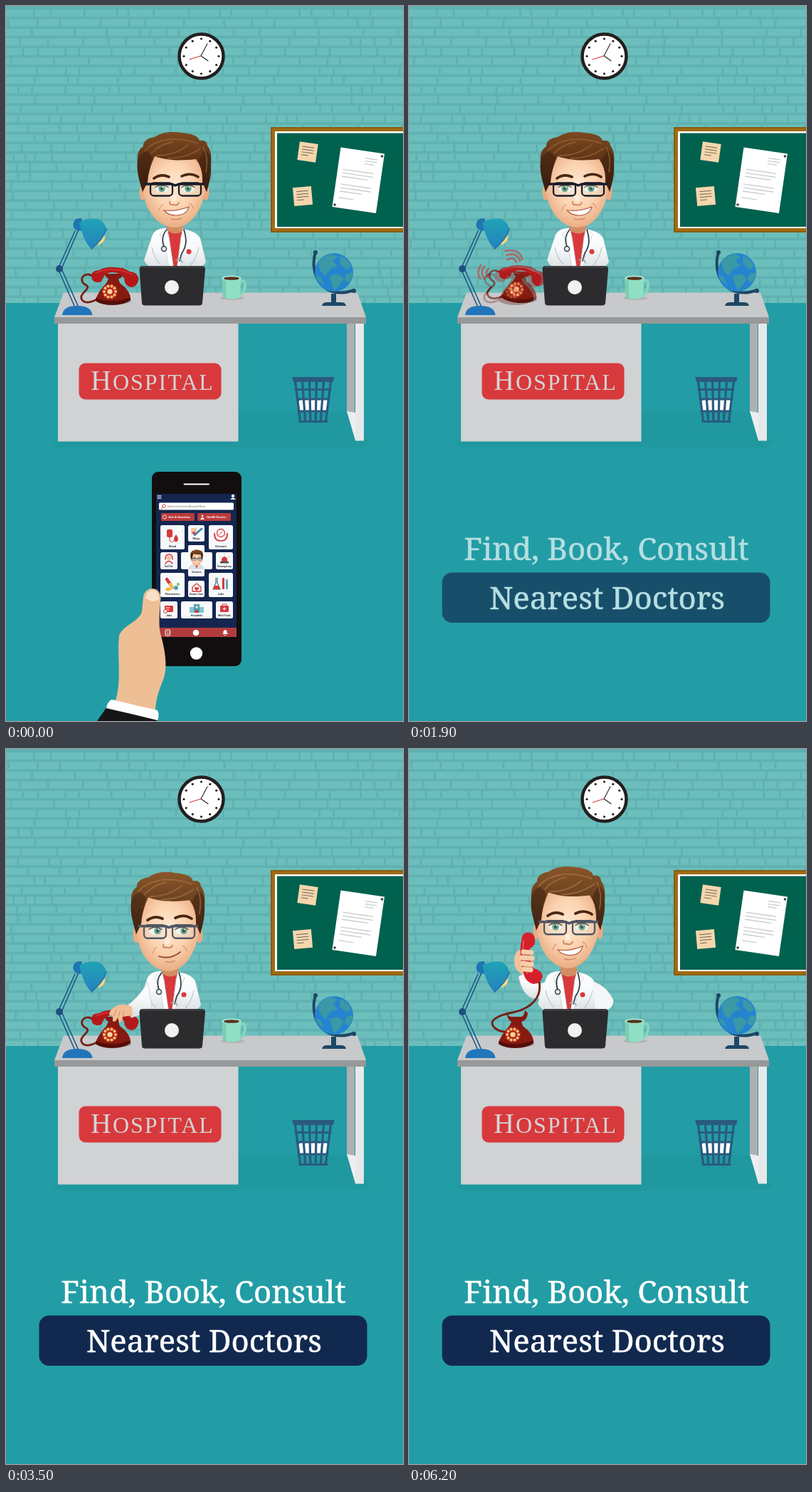
An HTML page for the animation above (8 s loop, 558 px wide and 1004 px high).

```html
<!DOCTYPE html>
<html lang="en">
<head>
<meta charset="utf-8">
<title>Doctors</title>
<style>
html, body { margin: 0; width: 100%; height: 100%; overflow: hidden; background: #229da5; }
svg { display: block; width: 100%; height: 100%; }
.mix { isolation: isolate; }
.mix > g { mix-blend-mode: plus-lighter; }
.slab { font: 43.7px "Noto Serif", serif; fill: #fff; stroke: #fff; stroke-width: .5; text-anchor: middle; }
.ui { font-family: Roboto, sans-serif; font-weight: 700; }
</style>
</head>
<body>
<svg id="stage" viewBox="0 0 558 1004"></svg>
<script>
const rect = (x, y, w, h, fill, r = 0, more = '') =>
  `<rect x="${x}" y="${y}" width="${w}" height="${h}" rx="${r}" fill="${fill}" ${more}/>`;
const circ = (x, y, r, fill, more = '') => `<circle cx="${x}" cy="${y}" r="${r}" fill="${fill}" ${more}/>`;
const oval = (x, y, a, b, fill, more = '') => `<ellipse cx="${x}" cy="${y}" rx="${a}" ry="${b}" fill="${fill}" ${more}/>`;
const path = (d, fill, more = '') => `<path d="${d}" fill="${fill}" ${more}/>`;
const line = (d, color, w = 1, more = '') =>
  path(d, 'none', `stroke="${color}" stroke-width="${w}" stroke-linecap="round" stroke-linejoin="round" ${more}`);
const group = (id, body, more = '') => `<g id="${id}" ${more}>${body}</g>`;
const label = (s, x, y, size, fill, anchor = 'middle') =>
  `<text class="ui" x="${x}" y="${y}" font-size="${size}" fill="${fill}" text-anchor="${anchor}">${s}</text>`;
const fade = (id, kind, stops) => `<${kind}Gradient id="${id}" ${kind === 'linear' ? 'x2="0" y2="1"' : 'cx=".5" cy=".45" r=".6"'}>` +
  stops.map((c, i) => `<stop offset="${i / (stops.length - 1)}" stop-color="${c}"/>`).join('') + `</${kind}Gradient>`;
const range = n => [...Array(n).keys()];

function wall() {
  let seed = 11, d = '';
  const rnd = () => (seed = seed * 16807 % 2147483647) / 2147483647;
  for (let y = 5; y < 417; y += 13.5)
    for (let x = -rnd() * 30; x < 558;) {
      const w = rnd() < .3 ? 10 + rnd() * 12 : 28 + rnd() * 32;
      d += `M${x.toFixed(1)} ${y}h${w.toFixed(1)}v9.8h${-w.toFixed(1)}z`;
      x += w + 3;
    }
  return rect(0, 0, 558, 417, '#60b2b2') + path(d, '#6cbebc') + rect(0, 417, 558, 587, '#229da5');
}

function clock() {
  const dots = range(12).map(i => circ(274.5 + 24.5 * Math.sin(i * Math.PI / 6), 70.5 - 24.5 * Math.cos(i * Math.PI / 6), 1.6, '#231f20'));
  return circ(274.5, 70.5, 31, '#fff', 'stroke="#231f20" stroke-width="4.5"') + dots.join('') +
    line('M283 53L274 70L284 77', '#231f20', 1.1) + line('M258 75L274 70', '#d8393f', 1.1);
}

function board() {
  const note = (x, y, a) => `<g transform="translate(${x} ${y}) rotate(${a})">` + rect(-13, -13, 26, 26, '#f5d6ad') +
    line('M-8 -7h16M-8 -3h16M-8 1h16M-8 5h9', '#6f665a', 1) + '</g>';
  return rect(372, 170, 200, 148, '#8a5d10') + rect(374, 172, 200, 144, '#a06c12') + rect(378, 176, 200, 136, '#fff') +
    rect(381, 178.5, 200, 131.5, '#00614f') + note(424, 205, 8) + note(417, 267, -5) +
    path('M470.500 198.500L532 207.500L520 291L458.500 282z', '#fff') +
    `<g transform="translate(470.500 198.500) rotate(8.200)">` +
    line('M37 10h16M37 14h16M37 18h12M8 30h42M8 35h42M8 40h36M8 51h42M8 56h42M8 61h30M8 70h20', '#c9cbcd', 1.3) + '</g>' +
    circ(528.5, 211, 1.8, '#3a3f44') + circ(462, 279, 1.8, '#3a3f44');
}

function basket() {
  const bars = range(6).map(i => `M${406.5 + i * 10} 527L${413.5 + i * 7.2} 583`).join('');
  return path('M411 556Q414 550 420 554Q425 547 430 553Q436 548 440 554Q448 549 453 555L451 569H413z', '#fff') +
    line(bars + 'M407 538.500H456M409 552H454M411 569H452', '#2a5a80', 3.2) + line('M413 583.500H451', '#2a5a80', 3) +
    path('M402 521H461.500L460 528H404z', '#2a5a80');
}

const desk = () =>
  path('M65 612H327V570H480L510 612Q508 620 490 620H80Q66 620 65 612z', '#1f949c', 'opacity=".6"') +
  path('M479 445H490V571L479 571z', '#aeb0b2') + path('M479 569L491 571V610z', '#eceeef') + rect(491, 445, 12, 165.5, '#e6e8e9') +
  basket() + rect(73, 445, 253.500, 166.500, '#d0d2d4') +
  path('M81 402.500H494L506 437H68z', '#c8c9cb') + rect(68, 437, 438, 9, '#969899') +
  rect(102.5, 501.5, 200, 51, '#d8393c', 9) +
  `<text x="119" y="539" font-family="Liberation Serif, serif" font-size="40" letter-spacing="2" fill="#d3d5d6">H<tspan font-size="32">OSPITAL</tspan></text>`;

const lamp = () =>
  line('M97 423L73 369L97 316M102 423L78 369L102 314', '#1d5688', 1.6) + circ(75, 369, 5, '#1d4f7c') +
  path('M79 434Q80 421 100 421Q120 421 121.500 434z', '#2176bb') +
  oval(131, 327, 9, 7, '#fbd77c', 'transform="rotate(-45 131 327)"') +
  path('M95 304Q97 297 106 298L109 313Q104 318 98 314Q93 310 95 304z', '#1d75b3') +
  path('M103 304Q116 297 130 299Q140 304 141 314Q136 326 120 341Q109 331 103 304z', 'url(#shade)') +
  line('M141 313Q137 327 120 341', '#2476b0', 2);

const globe = () =>
  line('M435 346C425 378 447 414 489 399', '#1d4766', 4) + circ(435, 346, 3, '#1d4766') + circ(489, 400, 3, '#1d4766') +
  rect(457, 404, 7, 13, '#1d4766') + path('M444 421Q445 416 451 416H471Q477 416 478 421z', '#1d4766') +
  circ(461, 374, 27, '#2584cf') +
  path('M439 360Q446 350 458 348L466 352L459 358L466 365L456 369L449 379L442 372zM469 351Q480 355 485 365L479 370L470 363zM455 379L467 376L475 383L469 392L462 400L458 390zM478 376L487 374Q487 382 482 389L476 385zM435 378L442 381L447 391Q439 388 435 378z', '#3b98a5');

const mug = () => oval(318, 410, 17, 3, '#a9abad', 'opacity=".7"') + line('M330 386Q337 384 336 393Q335 403 329 405', '#83d6bb', 4) +
  path('M303.500 382H330.500L329 409Q317 414 305 409z', '#8fdfc4') + path('M303.500 382H309L309 411L305 409z', '#79cdb1') +
  oval(317, 382, 13.5, 3.5, '#a9ecd5') + oval(317, 382.5, 11, 2.3, '#55331f');

const laptop = () => path('M192 365H276Q280 365 280 370L276 417Q276 420.500 271 420.500H196Q191 420.500 191 417L187.500 370Q187.500 365 192 365z', '#2c2c2f') +
  line('M191 366.500H277', '#48484c', 1.5) + circ(233, 395, 10, '#f2f2f2');

// ---- telephone
const phoneBase = () => oval(151, 414, 25, 5, '#85878a', 'opacity=".8"') +
  path('M137 368Q139 376 144 376H157Q162 376 163 367L167 371Q166 381 158 383L160 389Q175 400 175 411Q166 418 150 418Q134 418 126 412Q129 402 141 389L144 383Q137 379 137 368z', '#861a10') +
  path('M126 410Q150 419 175 409V413Q166 420 150 420Q134 420 126 414z', '#560e08') +
  circ(146, 401, 11, '#b8261a') +
  range(10).map(i => circ(146 + 8 * Math.cos(i * .628), 401 + 8 * Math.sin(i * .628), 2, '#f0c278')).join('') + circ(146, 401, 3.6, '#f3d69b');
const restCord = () => line('M125 382C112 369 100 384 111 391C124 397 98 404 108 414Q113 419 128 412', '#722116', 2.8);
const restHandset = () =>
  path('M120 377Q122 371 131 371Q140 366 152 367Q166 367 174 373Q184 373 186.500 383Q185 394 176 395Q166 393 166 382Q160 374 150 374Q142 374 138 379L134 387Q125 390 121 384z', '#b3191a') +
  line('M126 375Q152 364 177 377', '#d33433', 1.6);
const telephone = () => restCord() + phoneBase() + restHandset();
const ringing = () => `<g transform="translate(5 -3) rotate(4 150 400)">${telephone()}</g>` +
  line('M138 356Q147 351 151 360M137 350Q152 345 156 358M135 344Q156 340 159 356', '#c9403f', 2.6) +
  line('M112 369Q106 373 111 381M106 366Q99 373 106 383M101 364Q94 373 100 383', '#c9403f', 2.6);

// ---- doctor
function head(pose) {
  const frame = pose === 'A' ? '#191c29' : '#505563', look = pose === 'B' ? 3 : 0;
  const eye = x => oval(x, 256.5, 9, 4.8, '#f4f7f5') + circ(x + look, 256.5, 4.8, '#5d9c78') + circ(x + look, 256.5, 2.2, '#193229') +
    circ(x + look + 1.5, 254.5, 1, '#fff') + line(`M${x - 9} 254.500Q${x} 248.500 ${x + 9} 254.500`, '#4a2a19', 1.5);
  const mouth = pose === 'B'
    ? line('M224 291Q240 296 254 285', '#9a4a34', 1.8) + line('M233 298Q240 300 246 297', '#d48b63', 1.4)
    : path('M222 287Q239 289 257 282Q254 294 239 294Q228 294 222 287z', '#fff', 'stroke="#b55c46" stroke-width="1.200"') +
      line('M232 299Q240 301 247 298', '#d48b63', 1.5);
  const hair = pose === 'A' ? 'url(#hairDark)' : 'url(#hairLight)';
  const strand = pose === 'A' ? '#a0693a' : '#b07a48';
  return oval(192, 262, 4.5, 11, '#e9ac83') + oval(281, 262, 4.5, 11, '#e9ac83') +
    path('M193 225C190 252 193 272 201 287C211 304 225 311 237 311C250 311 262 303 270 288C280 272 283 248 279 222Q260 203 237 205Q205 204 193 225z', 'url(#skin)') +
    path('M192 261C188 246 183 233 185 217C184 207 187 201 193 197C192 190 200 185 209 184C220 176 236 176 247 178C260 179 270 182 272 189Q282 187 283 196Q290 204 288 222C289 238 285 250 282 261L276 247Q277 228 267 215C250 217 228 218 209 211C204 222 200 234 199 247z', hair) +
    path('M192 261C188 246 183 233 185 217Q189 205 198 204L206 212Q200 228 199 247zM282 261L276 247Q277 228 270 218L279 202Q289 206 288 222C289 238 285 250 282 261z', '#371c0f', 'opacity=".45"') +
    line('M195 203C212 185 241 183 270 193M204 207Q216 194 234 191M212 210Q238 210 256 195M228 214Q256 213 273 200M277 198Q285 212 281 233', strand, 1.8, 'opacity=".6"') +
    line('M208 242Q218 235 229 240M247 239Q259 233 270 240', '#4a2713', 3.6) + eye(219) + eye(256) +
    line('M230 275Q229 280 235 279Q241 281 243 276', '#ca805b', 1.8) + oval(236, 270, 4, 5, '#fff0e0', 'opacity=".75"') + mouth +
    line('M215 287Q217 280 221 279M263 284Q261 277 257 277', '#db9a72', 1.2) +
    rect(203, 248.5, 31, 18, '#d9f0f0', 5, `fill-opacity=".2" stroke="${frame}" stroke-width="2.300"`) +
    rect(243, 248.5, 31, 18, '#d9f0f0', 5, `fill-opacity=".2" stroke="${frame}" stroke-width="2.300"`) +
    line('M196 250L204 250H233L238 252L243 250H273L278 250', frame, 3.4);
}

const torso = (x = 0) => `<g transform="translate(${x} 0)">` +
  path('M222 312Q208 313 205 324L194 357Q199 368 212 370H265Q279 366 281 359L273 326Q268 316 248 313z', 'url(#coat)') +
  path('M226 309H249L250 323L243 372H231z', '#d8393c') + path('M226 306H249V316Q238 323 227 316z', '#d28d62') +
  path('M226 312L216 320L224 340L230 371H236L229 324zM249 312L258 321L250 341L244 371H240L246 324z', '#fff', 'stroke="#c9ced2" stroke-width=".8"') +
  line('M205 339Q208 354 217 363M271 339Q268 354 259 364', '#bcc3c8', 1.2) +
  line('M226 314Q217 324 222 338M250 314Q257 334 247 347L244 358', '#33414c', 1.8) +
  circ(222, 341, 3.5, '#e8ecee', 'stroke="#33414c" stroke-width="1.500"') + line('M239 357Q244 352 248 360', '#9aa4ab', 1.6) +
  circ(257, 345, 3.5, '#d8393c') + '</g>';

const doctorA = () => torso() + head('A');
const doctorB = () => torso(-7) + `<g transform="translate(-9 -10.600) scale(1 1.037)">${head('B')}</g>`;
const reach = () => path('M199 327Q190 345 170 361L176 377Q193 374 205 361z', 'url(#coat)', 'stroke="#c6ccd0" stroke-width=".8"') +
  path('M177 362Q164 355 153 362Q143 368 146 375Q151 371 150 382Q154 385 157 377L159 384Q164 384 164 376L178 374z', '#f0bd94') +
  line('M152 374L155 367M158 376L160 369M164 375L166 369', '#cc8963', .9);
const doctorC = () => path('M206 321Q185 331 181 329L164 313L154 320Q159 344 173 350Q187 352 204 348z', 'url(#coat)', 'stroke="#c6ccd0" stroke-width=".8"') +
  torso(-13) + path('M258 326Q278 333 287 352Q289 361 278 367L262 365z', '#f4f6f7') +
  `<g transform="translate(-13 -23.500) scale(1 1.065)">${head('C')}</g>` +
  path('M149 289Q153 279 164 282L175 300Q176 313 169 319Q158 319 150 308Q146 299 149 289z', '#f0c19b') +
  line('M183 327C187 349 172 363 150 369C122 374 112 382 119 390Q124 396 134 397', '#722116', 2.8) + phoneBase() +
  path('M159 263Q163 256 171 258Q178 261 177 272Q176 277 170 280Q169 298 175 308Q186 310 188 319Q185 330 175 330Q164 328 161 315Q155 291 157 275z', '#d51f2b') +
  line('M161 269Q158 292 166 315', '#ee5557', 1.8) +
  line('M161 285L172 286M159 293L173 294M160 301L172 303M162 309L171 310', '#f7cfab', 7) +
  line('M163 289H173M163 297H174M164 306H173', '#cb8861', .8);

// ---- hand-held app
const tiles = [
  ['Blood', 217, 729, 34, 34], ['Blogs', 256, 729, 23, 23], ['Discount', 285, 729, 34, 34],
  ['Call Dr.', 217, 767, 24, 24], ['Emergency', 295, 767, 24, 24],
  ['Pharmacies', 217, 796, 34, 34], ['Home Care', 256, 807, 23, 23], ['Labs', 285, 796, 34, 34],
  ['Jobs', 217, 836, 24, 24], ['Hospitals', 246, 836, 44, 24], ['Med Tools', 295, 836, 24, 24]];
const red = '#d8393c';
const icons = rect(226, 735, 8, 11, red, 2) + line('M230 746v5q5 4 7 -2', red) + path('M239 742q6 8 0 11q-6 -3 0 -11z', red) +
  rect(260, 733, 8, 9, '#f0c7a0', 1) + line('M265 743L275 734', '#397fb8', 2.5) + circ(264, 740, 2, red) +
  circ(302, 740, 5.5, 'none', `stroke="${red}" stroke-width="1.300"`) + line('M300 742L304 738', red) + line('M293 741Q293 751 301 751M311 741Q311 751 303 751', red, 2) +
  circ(229, 775, 3, '#f1bd92') + line('M224 777Q224 770 229 770Q234 770 234 777M224 783Q229 776 234 783', red, 1.5) +
  path('M303 780V776Q307 770 311 776V780z', red) + rect(301, 780, 12, 2.5, '#4b5058') + line('M307 770v-1M300 773l1 1M314 773l-1 1', '#f0a33a') +
  line('M226 805L231 812', red, 4.5) + line('M231 812L234 817', '#f2b653', 4.5) + circ(239, 817, 3, '#4da3b5') + oval(228, 819, 4, 2.5, '#f2b653') + circ(242, 812, 2, '#7cb867') +
  line('M262 816L268 811L274 816V822H262z', red, 1.3) + path('M268 821q-5 -4 -2 -5q2 0 2 1q1 -2 3 0q1 1 -3 4z', red) +
  line('M295 803V810L291 819H301L297 810V803', '#50667d', 1.2) + path('M293 814H299L301 819H291z', red) + rect(304, 803, 3, 16, red, 1) + rect(309, 805, 3, 14, '#5fa7c2', 1) +
  rect(223, 842, 12, 9, red, 1) + line('M225 845h5M225 848h4', '#fff') + circ(224, 850, 2.5, '#fff', `stroke="${red}"`) +
  rect(258, 844, 20, 8, '#83c5cf') + rect(264, 840, 8, 12, '#4c9cae') + line('M268 842v4M266 844h4', '#fff') + rect(266, 848, 4, 4, red) +
  rect(301, 842, 12, 9, red, 1) + line('M304 842v-2h6v2', red) + line('M307 844.500v4M305 846.500h4', '#fff');

const cross = 'M258 757H277Q279 757 279 759V767H288Q290 767 290 769V789Q290 791 288 791H279V799Q279 801 277 801H258Q256 801 256 799V791H248Q246 791 246 789V769Q246 767 248 767H256V759Q256 757 258 757z';

const holder = () => rect(205, 654, 126, 273, '#120e0f', 9) + line('M250.500 671.500H285', '#fff', 1.8) +
  rect(211, 685, 113, 201, '#14264f') + line('M213 687.500h5M213 689.500h5M213 691.500h5', '#fff', .9) +
  circ(319, 688, 2.2, '#fff') + path('M315 693q4 -5 8 0z', '#fff') +
  rect(215, 697.5, 105, 10, '#fff', 1.5) + circ(222, 702, 2.2, 'none', `stroke="${red}"`) + line('M220.500 704L218 706', red) +
  label('Search by Doctor/Disease/Word', 227, 704, 3.7, '#999', 'start') +
  rect(218, 712, 47, 11, '#b93b3c', 1.5) + rect(269, 712, 47, 11, '#b93b3c', 1.5) +
  label('Ask A Question', 243.5, 719.2, 4.4, '#fff') + label('Health Events', 295.5, 719.2, 4.4, '#fff') +
  circ(223, 717.5, 2.5, 'none', 'stroke="#fff" stroke-width=".8"') + circ(276, 716, 1.3, '#fff') + path('M273 721q3 -6 6 0z', '#fff') +
  tiles.map(([s, x, y, w, h]) => rect(x, y, w, h, '#f7f9fa', 2.5) + label(s, x + w / 2, y + h - 3, 3.9, '#33363c')).join('') + icons +
  path(cross, '#f7f9fa') + path('M256 791Q258 783 268 783Q277 783 279 791z', '#d9e0e4') + path('M265 783H271L268 790z', red) +
  `<svg x="258" y="762" width="20" height="25" viewBox="177 172 118 140">${head('A')}</svg>` +
  label('Doctors', 268, 796, 3.9, '#33363c') +
  group('tap', path(cross, '#14264f', 'opacity=".35"')) +
  rect(211, 873, 113, 13, '#b23c3d') + rect(224, 876, 6.5, 8, 'none', 1, 'stroke="#fff"') + line('M226 879h3M226 881.500h3', '#fff', .7) +
  circ(267, 880, 4.3, '#fff') + path('M304 882Q306 881 305.500 878Q308 874 310.500 878Q310 881 313 882zM306.500 883h3l-1.500 1.500z', '#fff') +
  circ(267.5, 909, 8.7, '#fff') +
  path('M128 1004L142 984L160 978L214 1004z', '#171517') +
  path('M148 974Q180 978 213 989Q216 996 213 1003Q177 994 141 986Q142 978 148 974z', '#fff') +
  path('M159 884C165 869 188 864 191 850L193 830C195 814 217 814 217.500 831C216 852 214 868 217 881C222 899 228 924 222 943C216 959 211 970 210 988Q181 982 154 975C163 948 156 911 159 884z', '#eebf95') +
  path('M196 831Q199 819 207 820Q215 822 215 833Q206 840 196 831z', '#f8e2cb');

const pointer = () => path('M251 786C247 777 259 773 264 781L299 845C309 838 334 845 352 861C371 878 368 909 373 934L331 960C306 946 283 931 275 909C269 892 279 882 293 887z', '#eebf95') +
  path('M252 785Q251 778 258 778Q263 783 262 787Q257 790 252 785z', '#f8e2cb') + line('M299 845L313 871M316 845Q325 858 326 874M333 851Q342 862 342 876', '#d59c70', 1.3) +
  path('M326 954Q352 946 373 927L384 945Q361 966 336 975z', '#fff') + path('M334 974Q362 965 384 943L393 956V1004H350z', '#171517');

const stage = document.getElementById('stage');
stage.innerHTML = '<defs>' +
  fade('skin', 'radial', ['#ffe8d2', '#fbd3b0', '#e6a67c']) + fade('hairDark', 'linear', ['#7c4a22', '#5c3216', '#3b1f10']) +
  fade('hairLight', 'linear', ['#8a5629', '#68401f', '#4a2b17']) + fade('coat', 'linear', ['#ffffff', '#f6f8f9', '#d9dfe3']) +
  fade('shade', 'linear', ['#1fa2b6', '#2583bd']) + '</defs>' +
  wall() + clock() + board() + desk() + lamp() +
  `<g class="mix">${group('phoneIdle', telephone())}${group('phoneRing', ringing())}</g>` +
  `<g class="mix">${group('doctorA', doctorA())}${group('doctorB', doctorB())}${group('doctorC', doctorC())}</g>` +
  group('reach', reach()) +
  group('voice', line('M179 261Q184 266 180 273M183 257Q190 266 184 276M187 254Q195 266 188 279', '#d8393c', 1.6)) +
  laptop() + mug() + globe() +
  group('holder', holder() + group('pointer', pointer())) +
  group('slogan', `<text class="slab" x="277.500" y="777.500">Find, Book, Consult</text>` +
    rect(46.5, 795.5, 461, 70.5, '#12294f', 14) + `<text class="slab" x="278.500" y="847">Nearest Doctors</text>`);

const ramp = (t, a, b) => Math.min(1, Math.max(0, (t - a) / (b - a)));
const show = (id, v) => document.getElementById(id).setAttribute('opacity', v);

function draw(now) {
  const t = Math.floor(now % 8000 / 100) * 100;
  const ring = ramp(t, 1500, 2100) - ramp(t, 2100, 2500) + ramp(t, 2500, 3000) - ramp(t, 3000, 3500);
  const turn = ramp(t, 2500, 3000), lift = ramp(t, 3600, 4400);
  show('pointer', ramp(t, 0, 400));
  show('tap', t >= 600 && t < 800 ? 1 : 0);
  show('holder', 1 - ramp(t, 900, 1500));
  show('slogan', ramp(t, 1500, 2100));
  show('phoneIdle', 1 - ring - lift);
  show('phoneRing', ring);
  show('doctorA', 1 - turn);
  show('doctorB', turn - lift);
  show('doctorC', lift);
  show('reach', ramp(t, 3000, 3500) * (1 - lift));
  show('voice', t >= 4400 && t < 6200 && t / 200 % 2 < 1 ? 1 : 0);
  requestAnimationFrame(() => draw(performance.now() - start));
}
const start = performance.now();
draw(0);
</script>
</body>
</html>
```
